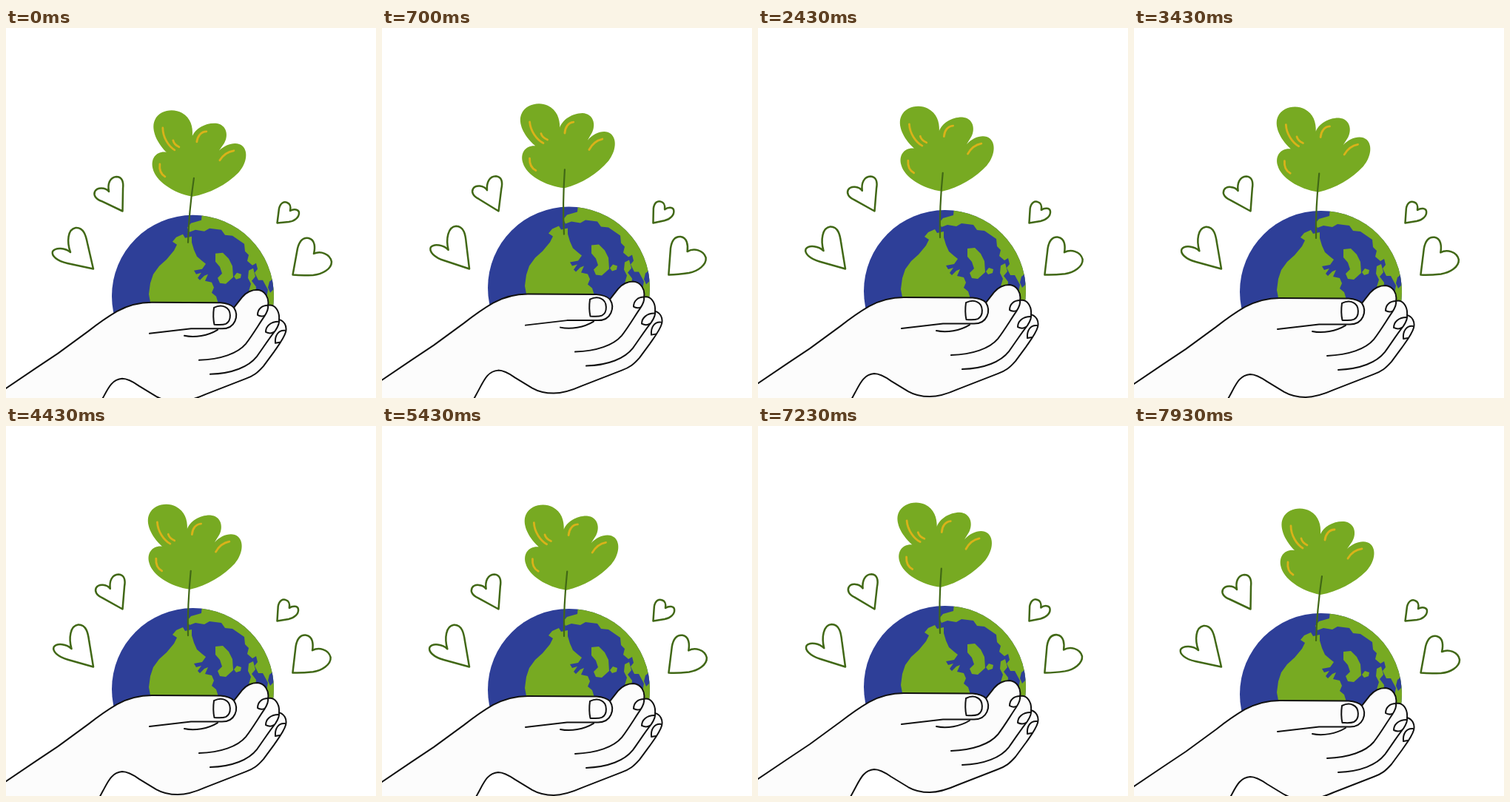
These frames come from a looping animation (500x500 px, 8 s). An HTML page:

```html
<!DOCTYPE html>
<html lang="en">
<head>
<meta charset="utf-8">
<title>Earth in hand</title>
<style>
html, body { margin: 0; width: 100%; height: 100%; overflow: hidden; background: #fff; }
svg { display: block; width: 100vw; height: 100vh; }
.line { fill: none; stroke: #111; stroke-width: 2; stroke-linecap: round; stroke-linejoin: round; }
.land { fill: #77aa22; }
.sea { fill: #2e3f98; }
.heart { fill: none; stroke: #416816; stroke-width: 2.5; stroke-linejoin: round; }
.shine { fill: none; stroke: #d9b21a; stroke-width: 2.8; stroke-linecap: round; }
.stem { fill: none; stroke: #416816; stroke-width: 2.2; stroke-linecap: round; }
</style>
</head>
<body>
<svg viewBox="0 0 500 500">
  <defs><clipPath id="disc"><circle cx="252.5" cy="362.5" r="109.5"/></clipPath></defs>

  <g id="hearts" class="heart">
    <path data-tip="158 248" data-turn="1" d="M157.500 247.500L129 234C121 231 118 226 120 221C123 215 134 215 139 221C137 211 140 202 149 201C157 201 159 208 158 217Z"/>
    <path data-tip="118 326" data-turn="1" d="M118 325.500L83 318C69 315 61 308 63 302C67 296 80 297 87 303C82 289 83 272 94 270C105 269 108 281 110 291Z"/>
    <path data-tip="366 264" data-turn="-1" d="M366.500 263.500L369 244C371 236 376 234 380 236C385 238 385 242 384 247C389 244 396 245 396 250C396 256 390 261 382 262Z"/>
    <path data-tip="387 335" data-turn="-1" d="M387.500 333.500L394 298C397 286 403 283 409 284C418 286 418 297 416 305C425 301 438 305 440 316C440 326 427 333 415 334C405 334.500 396 334.500 387.500 333.500Z"/>
  </g>

  <g id="world">
    <g clip-path="url(#disc)">
      <rect class="sea" x="140" y="250" width="226" height="226"/>
      <path class="land" d="M225 289L230 283L239 279L242 284L251 282L251 290L254 300L258 309L265 315L270 319L265 326L254 328L257 333L264 331L259 338L262 341L268 335L273 333L269 342L278 344L281 351L278 358L284 363L288 376H196L193 360L195 345L199 333L207 322L217 313L227 301L231 293Z"/>
      <path class="land" d="M265 250L264 260L250 264L245 270L248 276L256 273L268 275L275 271L291 273L296 280L306 281L322 292L323 302L328 307L326 315L333 321L338 318L340 326L336 331L341 341L347 341L354 354L352 364L355 372V390H370V250Z"/>
      <path class="land" d="M283 305L293 304L301 312L306 322L307 337L297 346L289 345L286 338L292 332L289 323L283 316Z"/>
      <path class="land" d="M308 336L312 331L318 333L317 338L311 340Z"/>
      <path class="land" d="M328 328L334 325L337 336L332 342L338 350L337 360L328 356L331 346L327 338Z"/>
      <path class="sea" d="M356 343L361 339V354L357 358L354 351Z"/>
    </g>
    <g id="plant">
      <path class="land" d="M252 228C225 223 202 206 198.500 190C195 176 204 166 217 168C202 153 196 135 201.500 124C208 110.500 227 108.500 238 115C250 122 253 134 252 146C256 136 270 128 284 129C299 131 301 146 295 156L288 166C298 156 313 153 320 160C328 168 325 184 314 196C298 212 275 224 252 228Z"/>
      <g class="shine">
        <path d="M212 135C212 148 220 160 228 165"/>
        <path d="M226 152C227 157 230 159 234 161"/>
        <path d="M258 154C259 146 264 140 271 140"/>
        <path d="M289 179C294 171 301 167 308 166"/>
        <path d="M208 184C207 192 210 198 215 201"/>
      </g>
      <path class="stem" d="M254 203Q247 250 246 290"/>
    </g>
    <g class="line">
      <path fill="#fcfcfc" d="M-30 506L0 487L40 460L70 440L111 410C125 399 138 390 150 383C165 375 179 371 197 371L290 371.500C297 372 303 373 308 378L319 364C325 357 333 354 340 354C350 355 356 365 354 375C363 373 370 382 369 394C376 396 380 403 378 411C376 419 369 428 362 438L348 457C340 466 335 470 324 474L270 495C252 503 242 505 232 505C218 505 210 502 203 498L180 484C170 477 164 474 157 474C143 475 138 487 131 500L118 524H-30Z"/>
      <path d="M308 378C315 389 310 406.500 292 406.500L250 406.500L194 413"/>
      <path d="M281 378C287 375 292 375 296 377C305 381 305 396 297 400C292 402 286 401 281.500 401C280 394 280 385 281 378Z"/>
      <path d="M241 416C255 419 273 416 286 408"/>
      <path d="M261 449C290 448 313 440 324 427C334 414 342 400 349 390C353 384 355 380 354 375"/>
      <path d="M340 388C340 380 346 375 354 375M340 388C343 390 346 390 349 389"/>
      <path d="M276 468C306 467 328 458 339 444C349 430 356 419 364 409C368 403 370 399 369 394"/>
      <path d="M351 411C351 403 358 397 368 397M351 411C355 413 359 413 362 411"/>
      <path d="M364 426C363 416 368 408 377 409M364 426L370 425"/>
    </g>
  </g>
</svg>
<script>
const LOOP = 8000, PERIOD = 40, LEAD = 1.4;
const RISE = 13, SWAY = 5.3, TURN = 7;
const world = document.getElementById('world');
const plant = document.getElementById('plant');
const hearts = [...document.querySelectorAll('#hearts path')];

// Poses alternate between 30 ms and 70 ms.
const poseAt = t => Math.floor(t / 100) * 2 + (t % 100 >= 30 ? 1 : 0);

function draw(t) {
  const phase = (poseAt(t % LOOP) + LEAD) / PERIOD;
  const lift = (1 - Math.cos(phase * 2 * Math.PI)) / 2;
  world.setAttribute('transform', `translate(0 ${-RISE * lift})`);
  plant.setAttribute('transform', `rotate(${-SWAY * lift} 246 290)`);
  for (const heart of hearts) {
    const { tip, turn } = heart.dataset;
    heart.setAttribute('transform', `rotate(${turn * TURN * lift} ${tip})`);
  }
}

const start = performance.now();
function tick() {
  draw(performance.now() - start);
  requestAnimationFrame(tick);
}
draw(0);
requestAnimationFrame(tick);
</script>
</body>
</html>
```
